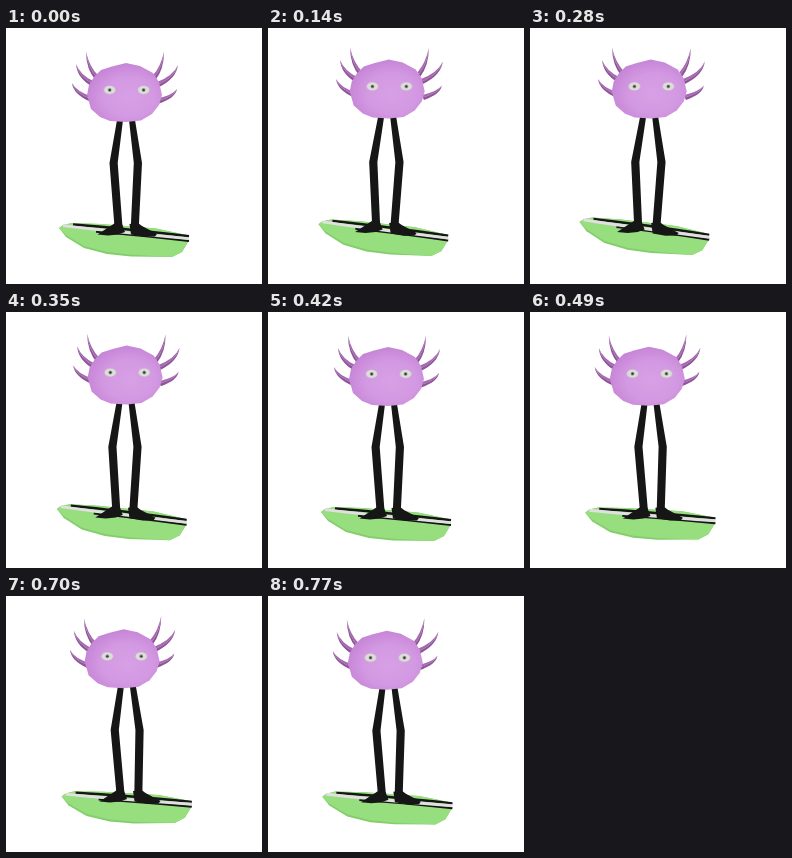
An HTML page for the animation above (840 ms loop, 256x256 px).

```html
<!DOCTYPE html>
<html lang="en">
<head>
<meta charset="utf-8">
<title>Surfing creature</title>
<style>
html, body { margin: 0; width: 100%; height: 100%; overflow: hidden; background: #fff; }
svg { display: block; width: 100vw; height: 100vh; }
</style>
</head>
<body>
<svg id="stage" viewBox="0 0 256 256">
  <defs>
    <radialGradient id="skin" cx=".56" cy=".58" r=".58">
      <stop offset="0" stop-color="#d7a0e5"/>
      <stop offset=".6" stop-color="#d398e2"/>
      <stop offset="1" stop-color="#c685d6"/>
    </radialGradient>
  </defs>
</svg>
<script>
const STEP = 70, COUNT = 12;
const INK = '#161616';
const stage = document.getElementById('stage');

function add(tag, attrs, parent = stage) {
  const el = document.createElementNS('http://www.w3.org/2000/svg', tag);
  for (const k in attrs) el.setAttribute(k, attrs[k]);
  return parent.appendChild(el);
}
const pts = s => s.split(' ').map(p => p.split(',').map(Number));
const join = list => list.map(p => p.map(n => n.toFixed(2)).join(' '));
const poly = list => 'M' + join(list).join('L') + 'Z';
const curve = list => {
  const [a, b, c] = join(list);
  return `M${a}Q${b} ${c}`;
};

// Board: two outlines and three stripe curves, bent between nose and tail.
const hull = '53,200 57,197 66,195 95,196 150,200.5 183,207.5 182,214 176,224 166,229 ';
const board = [
  [poly, hull + '125,228.5 101,226 78,220 60,209', { fill: '#84cd6c' }],
  [poly, hull + '125,226.8 101,224 78,218 60,207', { fill: '#96de7e' }],
  [curve, '67,196.5 115,200 183,208.2', { stroke: INK, 'stroke-width': 2.4 }],
  [curve, '90,203.6 130,206.6 183,213', { stroke: INK, 'stroke-width': 2.2 }],
  [curve, '57,197.6 105,203.4 183,210.6', { stroke: '#e2dfe2', 'stroke-width': 2.9 }]
].map(([shape, s, style]) => ({ shape, list: pts(s), el: add('path', { fill: 'none', ...style }) }));

const legs = [0, 1].map(() => add('path', { fill: INK }));
const feet = [
  '91.5,206.5 106,197 109,195 116,196 119,204 112,206.5 102,207.5',
  '123.5,196 132,195 136,198 151,206 149,208.5 138,208.8 125,206.5'
].map(s => add('path', { fill: INK, d: poly(pts(s)) }));

// A tapered horn that rises from its base and bends towards its tip.
function horn(parent, tx, ty, bx, by) {
  const bend = [tx + (bx - tx) * .15, ty + (by - ty) * .62];
  const w = 2.4, side = Math.sign(bx - tx);
  const edge = d => [bx + side * d * .5, by - d];
  const spine = d => `${bend[0] + side * d * .7} ${bend[1] - d * .5}`;
  const half = (d, fill) => add('path', {
    fill, d: `M${tx} ${ty}Q${spine(d)} ${edge(d)}L${bx} ${by}Q${spine(0)} ${tx} ${ty}Z`
  }, parent);
  half(w, '#a569b0');
  half(-w, '#8f5499');
}
const hornL = add('g', {}), hornR = add('g', {});
horn(hornL, 80, 23.5, 91, 50);
horn(hornL, 70, 36, 87, 56);
horn(hornL, 66, 55, 85, 71);
horn(hornR, 158, 23.5, 148, 50);
horn(hornR, 172, 37, 151, 57);
horn(hornR, 171, 61, 152, 73);

const head = add('g', {});
add('path', {
  fill: 'url(#skin)',
  d: poly(pts('81,67 83,57 88,49 95,42 106,38.5 120,35 134,38 147,45 153,54 156,67 153,77 146,86 135,92.5 120,94 104,93 94,89 85,81'))
}, head);
for (const cx of [103.7, 137.6]) {
  const at = { cx, cy: 62 };
  add('ellipse', { ...at, rx: 6.4, ry: 4.5, fill: '#c9b9cb' }, head);
  add('ellipse', { ...at, rx: 5.4, ry: 3.9, fill: '#dedddb' }, head);
  add('circle', { ...at, r: 2, fill: '#a5a5a3' }, head);
  add('circle', { ...at, r: 1.2, fill: '#3c3c3c' }, head);
}

// Each part leans with the swing s and lifts or drifts with its square.
const sway = (s, dx, dy, drift = 0, lift = 0) => [dx * s + drift * s * s, dy * s + lift * s * s];
const plus = ([x, y], [dx, dy]) => [x + dx, y + dy];

function shift(el, [x, y]) {
  el.setAttribute('transform', `translate(${x.toFixed(2)} ${y.toFixed(2)})`);
}

function drawLeg(el, hip, knee, ankle) {
  const side = ([x, y], w) => [x + w, y];
  el.setAttribute('d', poly([
    side(hip, -3), side(knee, -4.2), side(ankle, -4),
    side(ankle, 4), side(knee, 4), side(hip, 3)
  ]));
}

function draw(ms) {
  const phase = 2 * Math.PI * (Math.floor(ms / STEP) % COUNT) / COUNT;
  const s = Math.sin(phase);
  const roll = s - .15 * Math.sin(2 * phase);

  const nose = sway(roll, -3.5, -3, 0, -3);
  const tail = sway(roll, -3.8, 1.2, 0, -2.6);
  for (const { shape, list, el } of board) {
    el.setAttribute('d', shape(list.map(p => {
      const u = (p[0] - 53) / 130;
      return p.map((n, i) => n + nose[i] * (1 - u) + tail[i] * u);
    })));
  }

  const body = sway(s, 1.8, -1.15, -1.1, -3.5);
  const hips = [-s, body[1]];
  const footL = sway(s, -3.7, -.9, -1.6, -2.3);
  const footR = sway(s, -3.4, 0, .8, -1.3);
  const kneeL = sway(s, -2, 0, -.8, -1.5);
  const kneeR = sway(s, -1.2, 0, .8, -1.5);
  drawLeg(legs[0], plus([114, 92], hips), plus([107.7, 135], kneeL), plus([112.5, 199], footL));
  drawLeg(legs[1], plus([126, 92], hips), plus([132, 135], kneeR), plus([128.8, 199], footR));
  shift(feet[0], footL);
  shift(feet[1], footR);
  shift(head, body);
  shift(hornL, sway(s, 2.4, -1.6, 0, -3.4));
  shift(hornR, sway(s, 3.2, 0, 0, -4.6));
}

const start = performance.now();
function tick() {
  draw(performance.now() - start);
  requestAnimationFrame(tick);
}
tick();
</script>
</body>
</html>
```
